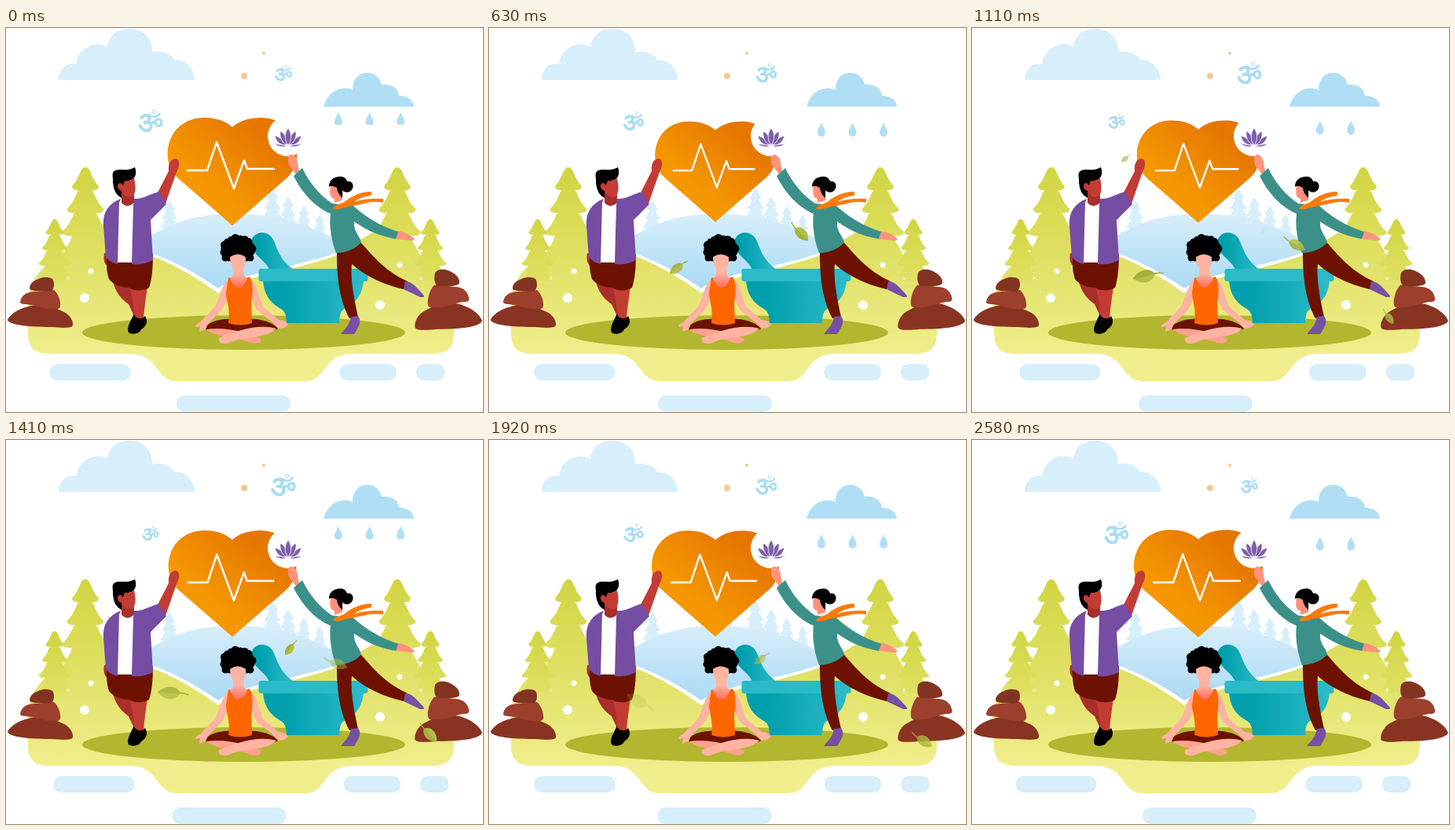
An HTML page for the animation above (2.61 s loop, 607 by 488 pixels).

```html
<!DOCTYPE html>
<html lang="en">
<head>
<meta charset="utf-8">
<title>Wellness meadow</title>
<style>
html, body { margin: 0; height: 100%; overflow: hidden; background: #fff; }
svg { display: block; width: 100%; height: 100%; }
.line { fill: none; stroke-linecap: round; stroke-linejoin: round; }
</style>
</head>
<body>
<svg viewBox="0 0 607 488">
<defs>
  <linearGradient id="meadow" gradientUnits="userSpaceOnUse" x1="0" y1="177" x2="0" y2="415">
    <stop stop-color="#d0d441"/><stop offset="1" stop-color="#f0ee8c"/>
  </linearGradient>
  <linearGradient id="foliage" x2="0" y2="1"><stop stop-color="#d0d441"/><stop offset="1" stop-color="#e0e163"/></linearGradient>
  <linearGradient id="lake" x2="0" y2="1"><stop stop-color="#d7eefb"/><stop offset="1" stop-color="#a9d9f3"/></linearGradient>
  <linearGradient id="amber" x1="0" y1="1" x2="1" y2="0"><stop offset=".35" stop-color="#f59700"/><stop offset=".8" stop-color="#e57600"/></linearGradient>
  <linearGradient id="teal"><stop offset=".2" stop-color="#009fad"/><stop offset="1" stop-color="#2dbbc9"/></linearGradient>
  <linearGradient id="neck" x2="0" y2="1"><stop offset=".35" stop-color="#ffb3a3"/><stop offset="1" stop-color="#ff6a5a"/></linearGradient>
  <clipPath id="rainClip"><rect id="rainWindow" x="400" y="90" width="125" height="40"/></clipPath>
  <path id="drop" d="M0 0C1 5 5 8 5 13A5 5.2 0 0 1-5 13C-5 8-1 5 0 0Z"/>
  <g id="om" class="line" stroke="#a9dcf4" stroke-width="4">
    <path d="M-12-5C-9-9-2-9-2-4-2 0-6 1-8 1-3 0 1 2 0 7-2 13-10 13-14 5"/>
    <path d="M0 3C3-1 5 1 7 4 10 8 14 4 13 0 12-4 8-4 6-1" stroke-width="3.4"/>
    <path d="M-3-9C0-5 8-5 11-10" stroke-width="2.6"/><circle cx="4" cy="-12.500" r=".5"/>
  </g>
  <g id="leaf">
    <path d="M-9 0C-5-9 7-8 14 1 6 8-5 8-9 0Z" fill="#b3bf48"/>
    <path d="M-9 0Q2-1 14 1C6 8-5 8-9 0Z" fill="#a4b03a"/>
    <path class="line" d="M-17-2Q-12 0-8 0" stroke="#a4b03a" stroke-width="1.500"/>
  </g>
  <g id="rocks">
    <path fill="#893423" d="M2 371C6 362 22 353 41 352 57 352 67 358 74 361 82 365 86 373 85 378 83 382 70 381 58 380 40 380 5 379 2 371Z"/>
    <path fill="#9d3f2d" d="M18 348C20 338 28 335 38 335L61 333C67 338 70 348 69 354 68 358 64 357 58 357 46 357 36 352 25 351Q18 351 18 348Z"/>
    <path fill="#833321" d="M30 331C30 324 36 321 43 318 49 316 57 316 60 320 62 326 61 331 58 334 48 335 31 335 30 331Z"/>
  </g>
</defs>

<path fill="#d7eefb" d="M67 66C67 52 78 43 89 46 92 26 112 15 129 24 131 8 143 1 158 1 175 1 187 14 186 31 197 28 211 33 214 41 228 39 240 52 240 66Z"/>
<path fill="#b0dff5" d="M404 100C407 89 414 79 427 77 433 76 438 77 441 79 441 64 449 57 460 57 469 57 476 63 478 72 490 71 499 76 500 86 511 86 519 92 519 100Z"/>
<g fill="#f7c88f"><circle cx="303" cy="61" r="4"/><circle cx="328" cy="32" r="2"/></g>
<g id="rain" fill="#b0dff5" clip-path="url(#rainClip)"></g>
<use href="#om" id="omLeft"/><use href="#om" id="omRight"/>
<g id="puddles" fill="#d7eefb"></g>

<g id="farTrees" fill="#d7eefb"></g>
<path fill="url(#lake)" d="M180 267C210 247 245 236 290 236 345 236 385 250 425 272V335H180Z"/>
<path stroke="#fff" stroke-width="7" d="M180 288C215 300 242 316 270 335 300 314 365 309 425 288V350H180Z"/>
<path fill="url(#meadow)" d="M28 388V345C32 320 45 300 72 289 80 270 92 255 112 254 138 254 162 280 186 290 215 301 242 317 270 337 310 311 370 309 423 288 450 270 470 254 490 254 510 255 520 275 528 290 553 300 566 320 570 345V388Q570 414 545 414H440C403 414 408 449 381 449H217C190 449 195 414 158 414H53Q28 414 28 388Z"/>
<g id="nearTrees" fill="url(#foliage)"></g>
<g fill="#fff">
  <circle cx="100" cy="343" r="6"/><circle cx="108" cy="309" r="3.500"/><circle cx="79" cy="318" r="1.600"/>
  <circle cx="476" cy="352" r="6"/><circle cx="501" cy="301" r="3.500"/><circle cx="528" cy="318" r="1.800"/>
</g>
<ellipse cx="302.500" cy="387" rx="205.500" ry="22" fill="#b3b62f"/>
<use href="#rocks"/><use href="#rocks" transform="translate(608 -73.200) scale(-1.030 1.200)"/>

<g id="heart">
  <path fill="url(#amber)" d="M288 251L218 190C206 179 202 160 209 142 217 122 235 114 252 114 269 114 280 119 288 126 296 119 307 114 324 114 341 114 359 122 367 142 374 160 370 179 358 190Z"/>
  <path class="line" stroke="#fff" stroke-width="2.500" d="M231 181H256L268 145 290 204 303 168 307 179H341"/>
</g>
<circle cx="358.500" cy="137.500" r="25.500" fill="#fff"/>
<g fill="#7e5fa9" stroke="#fff" stroke-width=".8">
  <g id="petals"><path d="M342 137C348 138 354 143 356 149 349 149 344 145 342 137Z"/><path d="M349 131C356 135 358 141 358 149 351 146 348 139 349 131Z"/><path d="M341 147Q351 148 359 150 349 153 341 147Z"/></g>
  <use href="#petals" transform="translate(718) scale(-1 1)"/>
  <path d="M359 127C364 134 364 142 359 149 354 142 354 134 359 127Z"/>
</g>

<g id="mortar">
  <path fill="url(#teal)" d="M312 274C312 262 325 256 335 263 341 267 342 275 346 283 350 292 356 300 366 307H335C332 299 324 294 318 287Q312 281 312 274Z"/>
  <path fill="url(#teal)" d="M327 321H455C453 343 442 351 430 357Q424 361 424 375H357Q357 361 350 357C338 350 329 342 327 321Z"/>
  <rect x="321.500" y="306" width="139" height="16" rx="3" fill="#2abac8"/>
</g>

<g id="man">
  <path fill="#a82e2b" d="M125 286Q123 299 129 302L134 288ZM136 322C139 335 146 344 156 351L163 366 171 358C168 347 163 339 158 326Z"/>
  <path fill="#c33c34" d="M157 328C160 340 164 353 162 370L175 371C176 355 178 344 180 328ZM190 215L207 182C206 172 210 166 216 166 222 167 221 176 217 183L202 226Z"/>
  <path d="M163 363C164 370 174 371 177 366 181 373 179 379 172 383 170 389 160 390 156 387 153 380 159 372 163 363Z"/>
  <path fill="#6d1200" d="M129 287H187C187 303 186 319 182 330 175 335 161 334 157 330 148 330 136 326 131 319 128 309 127 299 129 287Z"/>
  <path fill="#fff" d="M143 222H164L162 298H142Z"/>
  <path d="M136 196C137 190 133 184 139 181 146 178 154 183 164 177 167 184 165 193 156 194L151 205 147 216Q137 211 136 196Z"/>
  <path fill="#a82e2b" d="M147 205V222Q154 230 163 222V209Z"/>
  <path fill="#c33c34" d="M151 194Q158 195 163 191C165 199 166 210 161 214 155 217 149 212 147 207 141 206 140 196 146 197L149 200Z"/>
  <path fill="#754da3" d="M146 217C130 223 123 235 124 251L127 291Q134 299 142 300L144 222ZM163 217C174 218 183 211 195 208L204 224 184 244 187 295Q174 302 160 300L162 225Z"/>
</g>

<g id="woman">
  <path fill="#ff937d" d="M371 188L360 174C357 164 361 158 366 162 373 166 370 174 374 184ZM495 258Q506 257 519 267 521 271 514 270L496 268Z"/>
  <path fill="#6d1200" d="M421 284L451 272C464 286 480 308 511 322L506 332C484 327 459 317 440 300 438 319 443 345 448 367L437 369C423 343 421 313 421 284Z"/>
  <path fill="#7750a4" d="M439 367L448 366C453 373 449 379 445 386L443 389H427C425 387 437 381 439 367ZM508 322C516 322 520 327 531 339 534 343 530 342 527 342L506 332Z"/>
  <path fill="#3b9189" d="M366 188L377 178C386 197 400 213 415 223L442 226C455 238 474 251 499 259L496 268C477 265 460 258 443 246 442 260 451 264 452 273 444 281 432 286 420 286 414 270 411 252 413 236 392 227 376 208 366 188Z"/>
  <path fill="#ff8f79" d="M413 199L429 197 428 219 418 222 418 217C411 216 412 208 413 199Z"/>
  <path d="M411 202C411 193 418 188 428 189 432 190 434 194 434 195 440 194 443 199 441 204 438 210 431 210 428 206L428 216Q422 211 421 203 414 199 411 202Z"/>
  <path fill="#fb7a0b" d="M416 230C420 222 426 225 432 220 440 213 452 208 464 208Q467 210 464 213 450 215 443 221 460 216 480 217V222C464 219 454 224 442 226 430 227 424 232 416 230Z"/>
</g>

<g id="yogi">
  <path fill="#6d1200" d="M253 382C258 372 276 368 298 370 321 368 339 373 346 382 336 390 263 390 253 382Z"/>
  <path fill="#ffb3a3" d="M284 319C275 324 273 341 266 354L247 374Q241 376 241 380L247 379 246 386 254 383 257 376 275 358 284 340ZM311 319C320 324 321 341 327 354L347 371Q356 371 359 377L354 381 347 382 339 374 319 358 311 340Z"/>
  <path fill="#ffa18f" d="M255 383C280 379 309 388 325 395 325 401 316 402 309 399 291 392 266 393 255 383Z"/>
  <path fill="#ffb3a3" d="M344 382C320 375 291 386 271 394 268 401 280 403 286 399 306 391 331 395 344 382Z"/>
  <path fill="#ff6500" d="M283 317Q297 322 310 316C315 324 314 339 312 349L313 375Q298 380 283 375C286 358 280 345 280 337Z"/>
  <path fill="url(#neck)" d="M289 302H302L303 315 307 318Q302 330 296 330 289 329 285 318L289 315Z"/>
  <g id="curls"><ellipse cx="295" cy="280" rx="19" ry="13"/></g>
  <path fill="#ffb3a3" d="M285 291Q295 284 305 291C306 301 302 309 295 309 288 308 285 299 285 291Z"/>
</g>
<g id="leaves"></g>
</svg>
<script>
const LOOP = 2610;
const $ = id => document.getElementById(id);
const add = (parent, name, attrs) => {
  const el = document.createElementNS('http://www.w3.org/2000/svg', name);
  for (const key in attrs) el.setAttribute(key, attrs[key]);
  return $(parent).appendChild(el);
};
const place = (el, x, y, scale = 1, angle = 0) =>
  el.setAttribute('transform', `translate(${x} ${y}) rotate(${angle}) scale(${scale})`);

// A fir is three flaring tiers on each side of a trunk
function fir(parent, x, y, scale) {
  const side = s => {
    let d = 'M0 0';
    for (let i = 0; i < 3; i++) {
      const w = 17 + 6.5 * i, top = 29 * i, inner = 7 + 5 * i;
      d += `C${s * inner} ${top} ${s * inner} ${top + 14} ${s * w} ${top + 24}Q${s * w} ${top + 30} ${s * inner} ${top + 29}`;
    }
    return d + `L${s * 27} 115H0Z`;
  };
  place(add(parent, 'path', { d: side(-1) + side(1) }), x, y, scale);
}
fir('farTrees', 208, 220, .4);
for (let i = 0; i < 4; i++) fir('farTrees', 339 + 20 * i, 205 + 11 * i, .44 - .04 * i);
for (const s of [-1, 1]) {
  fir('nearTrees', 299.5 + 198.5 * s, 177, 1);
  fir('nearTrees', 301 + 239 * s, 243, .68);
}

for (let i = 0; i < 14; i++) {
  const a = Math.PI * (.8 + 1.4 * i / 13);
  const r = 4.5 + Math.sin(i * 2.4);
  add('curls', 'circle', { cx: 295 + 18 * Math.cos(a), cy: 281 + 14 * Math.sin(a), r });
}
for (const x of [279, 284, 306, 311]) add('curls', 'circle', { cx: x, cy: 292, r: 4.5 });

const puddle = (x, y, width, drift) =>
  ({ x, drift, el: add('puddles', 'rect', { y, width, height: 21, rx: 10 }) });
const puddles = [
  puddle(55.5, 427, 103, 5.2), puddle(424.5, 427, 72.5, 5.2),
  puddle(522, 427, 36.5, 5.2), puddle(217, 467, 145, -5.5)
];

// Even drops fall first, odd drops follow in the gaps
const drops = [0, 1, 2, 3, 4].map(i => ({ odd: i % 2, x: 423 + 19.8 * i, el: add('rain', 'use', { href: '#drop' }) }));

const leaf = (start, life, x, y, dx, dy, angle, turn, size) =>
  ({ start, life, x, y, dx, dy, angle, turn, size, el: add('leaves', 'use', { href: '#leaf' }) });
const leaves = [
  leaf(200, 1600, 383, 247, 50, 49, 55, -50, 1),
  leaf(450, 1650, 247, 301, -63, 35, 130, 85, 1.25),
  leaf(700, 600, 205, 149, -14, 25, 110, 40, .5),
  leaf(1100, 1200, 371, 257, -36, 31, 115, 35, .75),
  leaf(950, 1550, 526, 365, 42, 27, 55, -40, 1)
];

const arch = (t, start, length) =>
  t > start && t < start + length ? Math.sin(Math.PI * (t - start) / length) : 0;

function draw(t) {
  const swing = (1 - Math.cos(2 * Math.PI * t / LOOP)) / 2;
  place($('omLeft'), 184.5, 119, 1 - .32 * swing);
  place($('omRight'), 353.5, 58, .71 + .31 * swing);
  puddles.forEach(p => p.el.setAttribute('x', p.x + p.drift * swing ** 1.4));

  const beat = 1 - .07 * arch(t, 0, 1500) - .04 * arch(t, 1800, 810);
  $('heart').setAttribute('transform', `translate(288.5 183) scale(${beat}) translate(-288.5 -183)`);

  const half = LOOP / 4, fall = t % half, turn = Math.floor(t / half) % 2;
  $('rainWindow').setAttribute('height', 33 + .03 * fall);
  drops.forEach(({ odd, x, el }) => {
    el.style.display = odd === turn ? '' : 'none';
    place(el, x, odd ? 103.5 + .03 * fall : 106.5 + .021 * fall);
  });

  leaves.forEach(({ start, life, x, y, dx, dy, angle, turn, size, el }) => {
    const u = (t - start) / life;
    el.style.opacity = Math.max(0, Math.min(1, 8 * u, 2 * (1 - u)));
    place(el, x + dx * u, y + dy * u, size * Math.max(0, Math.min(1, .5 + 2 * u)), angle + turn * u);
  });
}

(function tick() {
  draw(performance.now() % LOOP);
  requestAnimationFrame(tick);
})();
</script>
</body>
</html>
```
